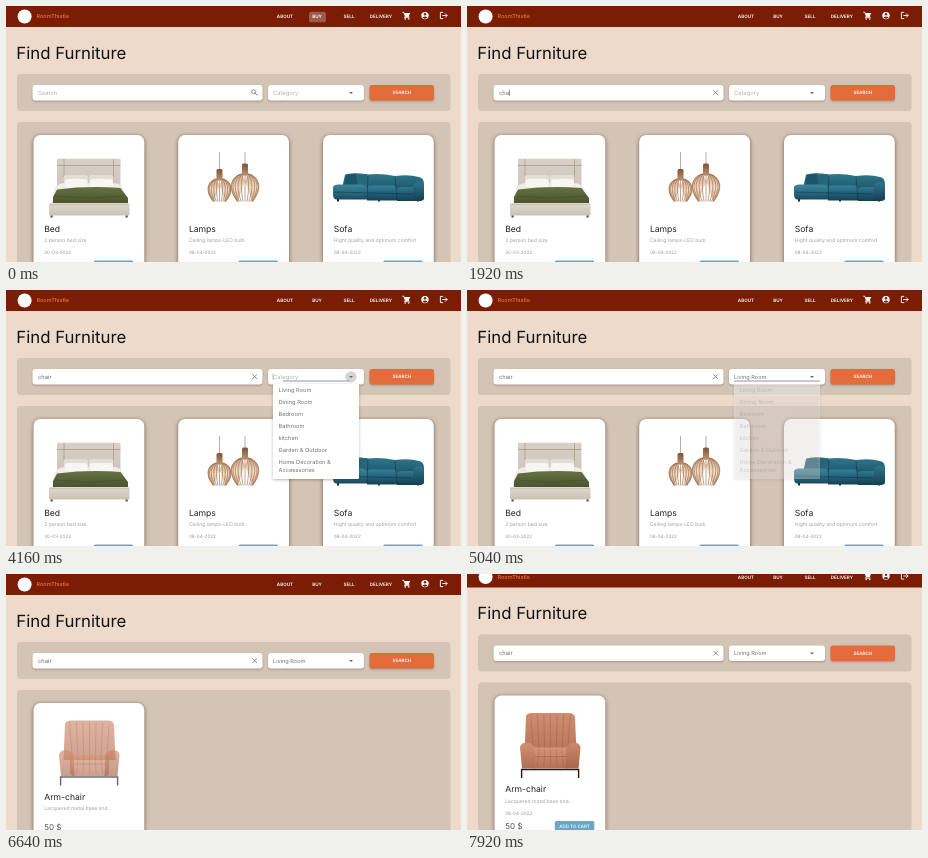
Recreate the animation shown at these times as an HTML page with a canvas. Size 455 by 256 pixels, loop 8000 ms.

```html
<!DOCTYPE html>
<html lang="en">
<head>
<meta charset="utf-8">
<title>Find Furniture</title>
<style>
  html, body { margin: 0; width: 100%; height: 100%; overflow: hidden; background: #ecdacb; }
  canvas { display: block; width: 100vw; height: 100vh; }
</style>
</head>
<body>
<canvas id="stage"></canvas>
<script>
const W = 455, H = 256, LOOP = 8000;
const canvas = document.getElementById('stage');
const ctx = canvas.getContext('2d');
const FONT = 'Inter, "Open Sans", sans-serif';

const clamp = v => Math.max(0, Math.min(1, v));
const span = (t, from, len) => clamp((t - from) / len);
const easeOut = x => 1 - (1 - x) ** 3;

function resize() {
  const dpr = window.devicePixelRatio || 1;
  canvas.width = Math.round(innerWidth * dpr);
  canvas.height = Math.round(innerHeight * dpr);
  ctx.textRendering = 'geometricPrecision';
}

function text(str, x, y, size, color, weight = 400, align = 'left') {
  ctx.font = `${weight} ${size}px ${FONT}`;
  ctx.textAlign = align;
  ctx.fillStyle = color;
  ctx.fillText(str, x, y);
}

function box(x, y, w, h, r, color) {
  ctx.beginPath();
  ctx.roundRect(x, y, w, h, r);
  ctx.fillStyle = color;
  ctx.fill();
}

function shadowBox(x, y, w, h, r, color, blur, alpha, dy = 1) {
  const scale = canvas.width / W;
  ctx.save();
  ctx.shadowColor = `rgba(60,35,20,${alpha})`;
  ctx.shadowBlur = blur * scale;
  ctx.shadowOffsetY = dy * scale;
  box(x, y, w, h, r, color);
  ctx.restore();
}

function disc(x, y, r, color) {
  ctx.beginPath();
  ctx.arc(x, y, r, 0, 7);
  ctx.fillStyle = color;
  ctx.fill();
}

// Straight segments; each path is a flat list of coordinates.
function lines(color, width, ...paths) {
  ctx.beginPath();
  for (const p of paths) {
    ctx.moveTo(p[0], p[1]);
    for (let i = 2; i < p.length; i += 2) ctx.lineTo(p[i], p[i + 1]);
  }
  ctx.strokeStyle = color;
  ctx.lineWidth = width;
  ctx.stroke();
}

function shape(path, color) {
  ctx.fillStyle = color;
  ctx.fill(new Path2D(path));
}

function fade(y0, y1, ...colors) {
  const g = ctx.createLinearGradient(0, y0, 0, y1);
  colors.forEach((c, i) => g.addColorStop(i / (colors.length - 1), c));
  return g;
}

function withAlpha(a, draw) {
  if (a <= 0) return;
  ctx.save();
  ctx.globalAlpha *= a;
  draw();
  ctx.restore();
}

// Header

function header(t) {
  box(0, -12, W, 33, 0, '#7b1d05');
  disc(18.6, 10.5, 7, '#fff');
  text('RoomThistle', 30.5, 12.4, 5.5, '#ee7440', 500);

  withAlpha(1 - span(t, 240, 320), () => box(303, 5.7, 17, 10.6, 2.6, 'rgba(255,255,255,.27)'));
  const nav = { ABOUT: 279, BUY: 311, SELL: 343, DELIVERY: 374.8 };
  for (const name in nav) text(name, nav[name], 12.4, 4.6, '#fff', 600, 'center');

  lines('#fff', 0.9, [396.3, 6.2, 397.7, 6.2, 399.5, 10.4, 403.2, 10.4], [399.2, 10.2, 398.4, 11.7, 403.6, 11.7]);
  shape('M398 6.9H404.3L402.5 10.4H399.5Z', '#fff');
  disc(399.2, 13, 0.8, '#fff');
  disc(402.8, 13, 0.8, '#fff');

  disc(419, 9.6, 3.7, '#fff');
  disc(419, 8.3, 1.2, '#7b1d05');
  shape('M416.6 11.6Q419 9.4 421.4 11.6Q419 14 416.6 11.6Z', '#7b1d05');

  lines('#fff', 0.9, [437.2, 6.4, 434.4, 6.4, 434.4, 12.6, 437.2, 12.6],
    [436.3, 9.5, 441, 9.5], [439.2, 7.5, 441.2, 9.5, 439.2, 11.5]);
}

// Search bar

const KEYS = [1600, 1760, 1920, 2080, 2240];
const FOCUS = 4044, PICK = 4900, BLUR = 5984, RESULTS = 6400;

function searchField(t) {
  shadowBox(26.5, 79, 230, 15.5, 3, '#fff', 2, 0.3);
  const typed = 'chair'.slice(0, KEYS.filter(k => t >= k).length);
  if (typed) {
    text(typed, 32, 88.7, 5.8, '#6c6c6c');
    lines('#777', 0.8, [246.3, 84.3, 251, 89], [251, 84.3, 246.3, 89]);
  } else {
    text('Search', 32, 88.7, 5.8, '#b4b4b4');
    ctx.beginPath();
    ctx.arc(247.6, 85.7, 1.9, 0, 7);
    ctx.strokeStyle = '#777';
    ctx.lineWidth = 0.9;
    ctx.stroke();
    lines('#777', 1, [249, 87.1, 251.3, 89.4]);
  }
  if ((t >= 1040 && t < 1360) || (t >= 1600 && t < 2640)) {
    const x = 32.4 + (typed ? ctx.measureText(typed).width : 0);
    lines('#444', 0.6, [x, 83.5, x, 90]);
  }
}

function categoryField(t) {
  shadowBox(262, 79, 96, 15.5, 3, '#fff', 2, 0.3);
  const ripple = span(t, 3960, 160) * (1 - span(t, 4400, 240));
  withAlpha(ripple, () => disc(345, 86.8, 5.6, '#d4d4d4'));
  if (t < PICK) text('Category', 267, 88.8, 5.8, '#b4b4b4');
  else text('Living Room', 267, 88.8, 5.6, '#757575');
  if (t >= FOCUS && t < PICK) lines('#888', 0.5, [267, 83.5, 267, 90]);
  shape('M343 86H347L345 88.1Z', '#666');
  const half = 43 * easeOut(span(t, FOCUS, 300)) * (1 - easeOut(span(t, BLUR, 300)));
  if (half > 0.2) lines('#6f7a9c', 0.8, [310 - half, 91, 310 + half, 91]);
}

function searchButton(t) {
  shadowBox(363.5, 79, 64.5, 15.5, 2.8, '#e46c3b', 2, 0.3);
  const hover = span(t, 5600, 160) * (1 - span(t, 6000, 80));
  withAlpha(hover * 0.1, () => box(363.5, 79, 64.5, 15.5, 2.8, '#fff'));
  const p = span(t, 6100, 400);
  if (p > 0 && p < 1) {
    ctx.save();
    ctx.beginPath();
    ctx.roundRect(363.5, 79, 64.5, 15.5, 2.8);
    ctx.clip();
    withAlpha(0.25 * (1 - p), () => disc(396, 86.8, 34 * easeOut(p), '#fff'));
    ctx.restore();
  }
  text('SEARCH', 395.8, 88.4, 4.5, '#fff', 600, 'center');
}

const MENU = ['Living Room', 'Dining Room', 'Bedroom', 'Bathroom', 'kitchen',
  'Garden & Outdoor', 'Home Decoration &'];

function menu(t) {
  withAlpha(span(t, 4020, 120) * (1 - span(t, PICK, 200)), () => {
    shadowBox(267, 94, 86, 95, 1.5, '#fff', 3, 0.35);
    withAlpha(span(t, 4560, 200), () => box(267, 94, 86, 12, 0, '#f0f0f0'));
    MENU.forEach((item, i) => text(item, 272.5, 102.2 + i * 12, 5.7, '#747474'));
    text('Acceessories', 272.5, 182.2, 5.7, '#747474');
  });
}

// Product pictures

function bed() {
  box(51, 152.7, 63.5, 38, 1, fade(152, 190, '#d8d0c7', '#cbc2b8'));
  lines('#a8937f', 0.7, [51, 159.5, 114.5, 159.5], [58, 153, 58, 180], [107.5, 153, 107.5, 180]);
  shape('M49 182Q52 177 60 177H106Q114 177 117 182L121 200H45Z', '#f0ece7');
  for (const x of [57.5, 83]) {
    box(x, 169, 24.5, 10, 3, '#e3ddd6');
    box(x + 1, 173, 23, 8.5, 3, '#f8f6f3');
  }
  shape('M51 183.5Q83 179.5 114.5 182L122 192V198Q84 200 47 197.5V191Z', fade(181, 199, '#667144', '#46512b'));
  lines('rgba(40,48,20,.35)', 0.7, [49, 190, 84, 192, 119, 190]);
  box(43, 197, 80.5, 12.5, 1.5, fade(197, 210, '#e2dad0', '#c9beb2'));
  lines('#b3a799', 0.5, [43.5, 198.6, 123, 198.6]);
  box(44.5, 209.5, 2.2, 2, 0, '#5b4d44');
  box(119.5, 209.5, 2.2, 2, 0, '#5b4d44');
}

// A barrel of thin ribs hanging below a slim wooden neck.
function lamp(x, top, shoulder, r) {
  const bottom = 195.5, mid = shoulder + (bottom - shoulder) * 0.45;
  lines('#6b5a50', 0.5, [x, 146, x, top]);
  const rib = k => {
    ctx.moveTo(x + k * 3, shoulder);
    ctx.bezierCurveTo(x + k * r * 0.75, shoulder + 1, x + k * r, mid - 5, x + k * r, mid);
    ctx.bezierCurveTo(x + k * r, mid + 6, x + k * r * 0.75, bottom - 4, x + k * r * 0.55, bottom);
  };
  ctx.beginPath();
  rib(-1);
  ctx.lineTo(x + r * 0.55, bottom);
  rib(1);
  ctx.lineTo(x - r * 0.55, bottom);
  ctx.fillStyle = fade(shoulder, bottom, '#cda889', '#f0dfcb', '#d2ae8e');
  ctx.fill();
  ctx.beginPath();
  for (let i = -6; i <= 6; i++) rib(Math.sin(i * Math.PI / 12));
  ctx.strokeStyle = '#a06f4b';
  ctx.lineWidth = 0.65;
  ctx.stroke();
  box(x - 3, top, 6, shoulder - top + 1.5, 1.5, fade(top, shoulder, '#7d5439', '#b58a68'));
}

function lamps() {
  lamp(213.5, 163, 173, 11.5);
  lamp(239, 157.5, 168, 13.8);
}

function sofa() {
  for (const x of [331, 372, 411]) box(x, 193, 2, 2.6, 0, '#1b2a30');
  shape('M339 168.5Q350 166 361 168.5Q375 167 389 170Q403 168 413 171Q418 172 418 178V192H334Z',
    fade(167, 188, '#31788e', '#174e61'));
  shape('M340 169L350 167.5L354 179H338Z', '#1c5569');
  shape('M350 169.5L361 168L364 180H352Z', '#27667b');
  shape('M327 181Q328 178 334 178.5H356Q361 179 361 183V193.5H330Q327 193 327 188Z',
    fade(178, 194, '#3d879b', '#2a6d82', '#154a5d'));
  shape('M361 181Q362 179.5 366 179.5H387Q391 180 391 184V194.5H361Z',
    fade(179, 195, '#38819a', '#22617a', '#123f52'));
  shape('M391 183Q392 181 396 181H410V195H391Z', fade(181, 195, '#317891', '#1e5a70', '#123f52'));
  shape('M407 180Q408 176 413 176Q418 176 418 181V193Q417 195 413 195H407Z',
    fade(176, 195, '#2f758b', '#143f51'));
  lines('rgba(8,38,50,.6)', 0.7, [362, 170, 361, 193], [389, 171, 391, 194], [328, 186, 406, 188]);
}

function chair() {
  lines('#201c1b', 1.4, [54.6, 211.5, 54.6, 203, 111.6, 203, 111.6, 211.5]);
  shape('M59 150Q59.5 146.5 65 146.5H102Q107.5 146.5 108 151L109.5 186H57.5Z', fade(146, 186, '#d08d72', '#b97559'));
  for (let i = -3; i <= 3; i++) lines('rgba(125,62,42,.3)', 0.8, [83.5 + i * 6.6, 148, 83.5 + i * 5.8, 183]);
  box(64, 181, 39, 21, 4, fade(181, 202, '#d79578', '#b56f54'));
  for (let i = -2; i <= 2; i++) lines('rgba(125,62,42,.28)', 0.8, [83.5 + i * 5.6, 183, 83.5 + i * 6.6, 200]);
  lines('rgba(125,62,42,.35)', 0.9, [67, 190, 100, 190]);
  shape('M53 181Q54 175 62 176.5Q68 178 67.5 184L68.5 202H55Z', fade(176, 202, '#d39075', '#b06d53'));
  shape('M113.5 181Q112.5 175 105 176.5Q99 178 99.5 184L98.5 202H111.5Z', fade(176, 202, '#cb886d', '#a9664d'));
}

// Cards

const GOODS = [
  { x: 27.5, name: 'Bed', note: '2 person bed size', date: '30-03-2022', art: bed },
  { x: 172.2, name: 'Lamps', note: 'Ceiling lamps-LED bulb', date: '08-04-2022', art: lamps },
  { x: 317, name: 'Sofa', note: 'Hight quality and optimum comfort', date: '08-04-2022', art: sofa }
];
const RESULT = { x: 27.5, name: 'Arm-chair', note: 'Lacquered metal base and...', date: '08-04-2022', art: chair };

function card({ x, name, note, date, art }, reveal = 1, detail = 1, price = 0) {
  shadowBox(x, 129, 110.8, 160, 7, '#fff', 4.5, 0.65, 1);
  withAlpha(reveal, art);
  text(name, x + 10.7, 225.8, 8.6, '#222');
  text(note, x + 10.7, 236.3, 5.05, '#a2a2a2');
  withAlpha(detail, () => {
    text(date, x + 10.7, 248.3, 4.6, '#979797');
    box(x + 60.3, 254.4, 39.5, 10.2, 1.5, '#6fa5c4');
    text('ADD TO CART', x + 80, 261.2, 4.5, '#fff', 500, 'center');
  });
  if (price) text('50 $', x + 10.7, price, 8, '#505050');
}

function cards(t) {
  if (t < RESULTS) GOODS.forEach(g => card(g));
  else card(RESULT, span(t, RESULTS, 360), span(t, 7360, 120), t < 7360 ? 256 : 262.6);
}

function draw(t) {
  ctx.setTransform(canvas.width / W, 0, 0, canvas.height / H, 0, 0);
  ctx.fillStyle = '#eddacb';
  ctx.fillRect(0, 0, W, H);

  const s = span(t, 7680, 240);
  ctx.translate(0, -7.5 * s * s * (3 - 2 * s));
  header(t);
  text('Find Furniture', 10.3, 52.7, 16.8, '#111');
  box(11, 68, 433.5, 37, 3.5, '#d4c4b6');
  box(11, 116, 433.5, 180, 3.5, '#d4c4b6');
  searchField(t);
  categoryField(t);
  searchButton(t);
  cards(t);
  menu(t);
}

addEventListener('resize', resize);
resize();
const start = performance.now();
(function tick() {
  draw((performance.now() - start) % LOOP);
  requestAnimationFrame(tick);
})();
</script>
</body>
</html>
```
